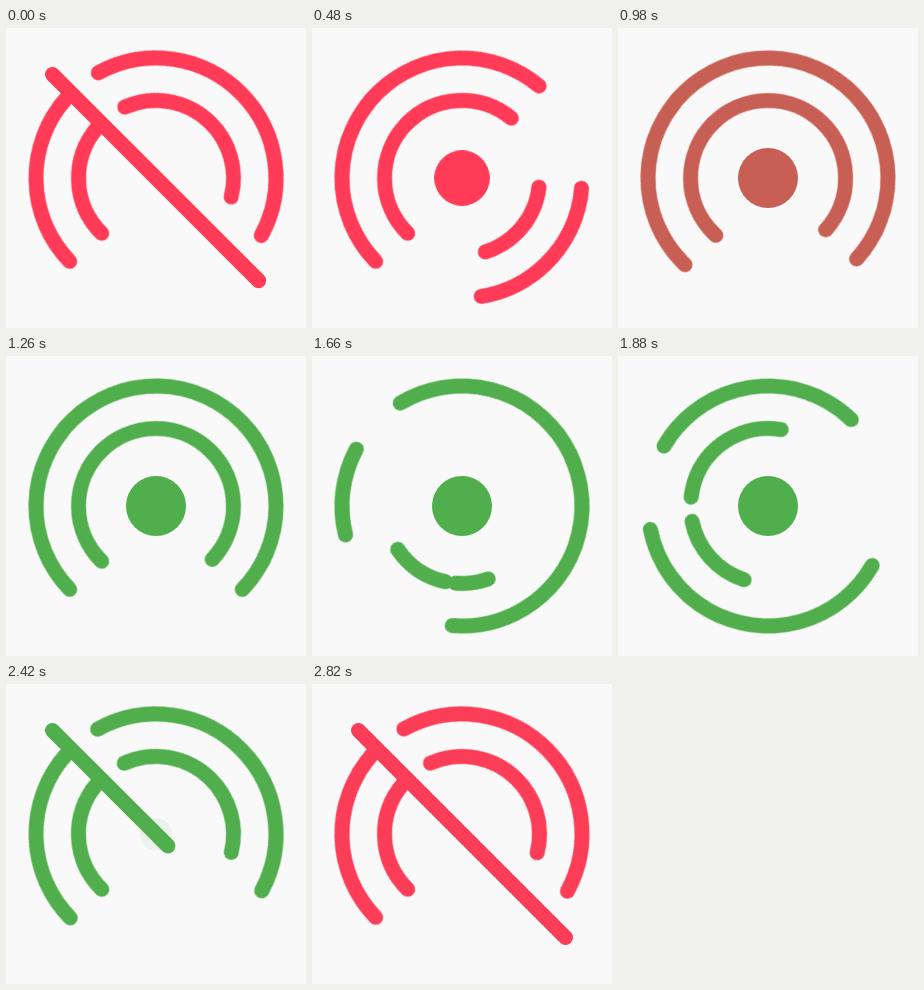
Write an HTML page that moves like this. It is 300x300 px and loops after 3.98 s.

```html
<!DOCTYPE html>
<html lang="en">
<head>
<meta charset="utf-8">
<title>Signal toggle</title>
<style>
  html, body {
    margin: 0;
    width: 100%;
    height: 100%;
    overflow: hidden;
    background: #f9f9f9;
  }
  svg {
    display: block;
    width: 100%;
    height: 100%;
    --spin: cubic-bezier(.25, .2, .32, .98);
  }
  svg, svg * {
    animation: 3980ms linear infinite;
  }
  svg { animation-name: tint; }
  .ring, .slash {
    fill: none;
    stroke: currentColor;
    stroke-width: 15;
    stroke-linecap: round;
  }
  .outer { animation-name: outer; }
  .inner { animation-name: inner; }
  .slash { animation-name: slash; }
  .dot { fill: currentColor; animation-name: dot, fade; }

  @keyframes tint {
    0% { color: #ff3b57; }
    22.74% { color: #ff3b57; animation-timing-function: ease; }
    31.91%, 62.31% { color: #50ae4d; }
    62.31% { animation-timing-function: ease; }
    70.85%, 100% { color: #fc3d57; }
  }

  /* Dash lists are in degrees: left arc, gap, right arc, gap. */
  @keyframes outer {
    0% { stroke-dasharray: 85 20 147.5 107.5; transform: rotate(0deg); }
    24.87% { stroke-dasharray: 268 92 0 0; transform: rotate(0deg); }
    36.81% {
      stroke-dasharray: 268 92 0 0;
      transform: rotate(0deg);
      animation-timing-function: var(--spin);
    }
    61.93%, 100% { stroke-dasharray: 85 20 147.5 107.5; transform: rotate(360deg); }
  }
  @keyframes inner {
    0% { stroke-dasharray: 86 25.5 128 120.5; transform: rotate(0deg); }
    24.87%, 36.8% { stroke-dasharray: 269 91 0 0; transform: rotate(0deg); }
    36.81% {
      stroke-dasharray: 0 0 10 350;
      transform: rotate(-90deg);
      animation-timing-function: var(--spin);
    }
    61.93%, 100% { stroke-dasharray: 86 25.5 128 120.5; transform: rotate(0deg); }
  }

  @keyframes slash {
    0% { stroke-dasharray: 100 200; opacity: 1; }
    6.02% { stroke-dasharray: 0 200; opacity: 1; }
    6.03%, 57.53% { stroke-dasharray: 0 200; opacity: 0; }
    57.54% { stroke-dasharray: 0 200; opacity: 1; }
    63.44%, 100% { stroke-dasharray: 100 200; opacity: 1; }
  }
  @keyframes dot {
    0%, 6.28% { transform: scale(0); }
    12.56%, 57.79% { transform: scale(1); }
    64.32%, 100% { transform: scale(0); }
  }
  @keyframes fade {
    0%, 6.28% { opacity: 0; }
    8%, 57.54% { opacity: 1; }
    61.13%, 100% { opacity: 0; }
  }
</style>
</head>
<body>
<svg viewBox="0 0 300 300">
  <g transform="translate(150 150)">
    <g transform="rotate(136)"><circle class="ring outer" r="120" pathLength="360"/></g>
    <g transform="rotate(134.5)"><circle class="ring inner" r="77.5" pathLength="360"/></g>
    <circle class="dot" r="30"/>
    <path class="slash" d="M-103.5-103.5 103.5 103.5" pathLength="100"/>
  </g>
</svg>
</body>
</html>
```
